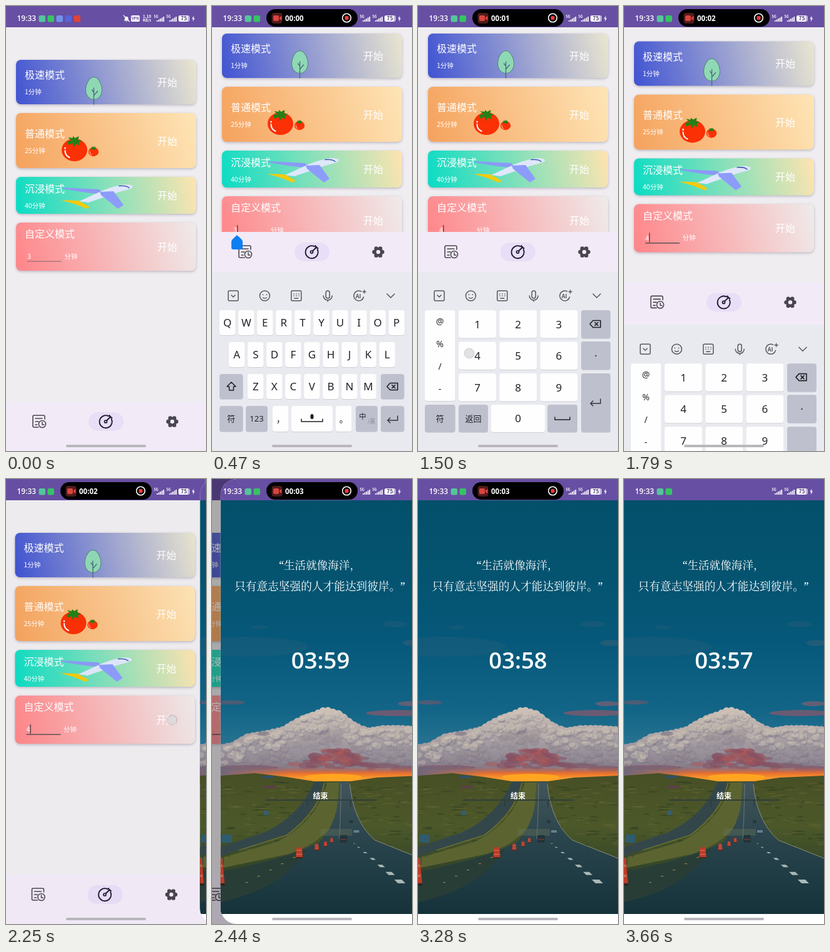
These frames come from a looping animation (320x711 px, 3.76 s). An HTML page with a canvas:

```html
<!DOCTYPE html>
<html lang="zh-CN">
<head>
<meta charset="utf-8">
<style>
html, body { margin: 0; width: 100%; height: 100%; overflow: hidden; background: #efedf0; }
canvas { display: block; width: 320px; height: 711px; }
</style>
</head>
<body>
<canvas id="stage"></canvas>
<script>
const W = 320, H = 711, LOOP = 3760;
const SANS = '"Noto Sans CJK SC", "Noto Sans CJK", "Noto Sans", sans-serif';
const LATIN = '"Noto Sans", "Noto Sans CJK SC", sans-serif';
const DIGITS = '"Open Sans", "Noto Sans", sans-serif';
const SERIF = '"Noto Serif", "Noto Serif CJK SC", "Noto Sans CJK SC", serif';
const PURPLE = '#674fa3', INK = '#49454f', DARK = '#1d192b';
const canvas = document.getElementById('stage');
const c = canvas.getContext('2d');
const dpr = window.devicePixelRatio || 1;
canvas.width = W * dpr;
canvas.height = H * dpr;

const clamp = v => Math.max(0, Math.min(1, v));
const ramp = (t, a, b) => clamp((t - a) / (b - a));
const easeOut = p => 1 - (1 - p) ** 3;

function text(s, x, y, size, { color = '#fff', weight = 400, align = 'left', font = SANS } = {}) {
  c.font = `${weight} ${size}px ${font}`;
  c.textAlign = align;
  c.fillStyle = color;
  c.fillText(s, x, y + size * 0.37);
}
function rect(x, y, w, h, color, r = 0) {
  c.fillStyle = color;
  c.beginPath();
  c.roundRect(x, y, w, h, r);
  c.fill();
}
function oval(x, y, rx, ry, color) {
  c.fillStyle = color;
  c.beginPath();
  c.ellipse(x, y, rx, ry, 0, 0, 7);
  c.fill();
}
const shape = (d, color) => { c.fillStyle = color; c.fill(new Path2D(d)); };
function line(d, color, width = 1.4) {
  c.strokeStyle = color;
  c.lineWidth = width;
  c.lineCap = c.lineJoin = 'round';
  c.stroke(new Path2D(d));
}
function at(x, y, draw) {
  c.save();
  c.translate(x, y);
  draw();
  c.restore();
}
function gradient(x0, y0, x1, y1, ...stops) {
  const g = c.createLinearGradient(x0, y0, x1, y1);
  stops.forEach((s, i) => g.addColorStop(i / (stops.length - 1), s));
  return g;
}
function seeded(seed) {
  return () => (seed = (seed * 16807) % 2147483647) / 2147483647;
}
const circle = r => `M${-r} 0a${r} ${r} 0 1 0 ${2 * r} 0a${r} ${r} 0 1 0 ${-2 * r} 0`;

// ---- status bar ----
function signal(x) {
  text('5G', x - 0.5, 16.5, 5.5, { weight: 700 });
  for (let i = 0; i < 5; i++) rect(x + 4 + i * 2.6, 23 - i * 1.5, 1.7, 2 + i * 1.5, '#fff', 0.5);
}
function statusBar(t) {
  text('19:33', 17.5, 20, 12, { weight: 600, font: DIGITS });
  const full = t < 100;
  ['#55c59a', '#35c463', '#7192ea', '#5564d8', '#e04436'].slice(0, full ? 5 : 2)
    .forEach((color, i) => rect(52.5 + i * 14, 15, 10.5, 10.5, color, 2.5));
  if (full) {
    shape('M188.5 23.5l1.5-2v-3a3 3 0 0 1 5.5 0v3l1.5 2zM191.5 24.5h2.500l-1.2 1.3z', '#fff');
    line('M188 15l9.5 10', '#fff', 1.1);
    rect(200, 15, 14, 10, '#fff', 2);
    text('VPN', 207, 20.2, 6, { color: PURPLE, weight: 700, align: 'center' });
    text('1.10', 225.5, 17, 6.3, { weight: 700, align: 'center' });
    text('KB/s', 225.5, 23.3, 5.8, { weight: 700, align: 'center' });
  }
  signal(237);
  signal(257);
  rect(276, 15, 18, 10, '#c5b9df', 3);
  rect(276, 15, 14.5, 10, '#fff', [3, 0, 0, 3]);
  text('75', 284.5, 20.2, 8.5, { color: '#4d3f78', weight: 700, align: 'center' });
  shape('M300.5 15.5l-3 5h2l-.6 4.5 3.2-5.5h-2z', '#fff');
  island(t);
}
function island(t) {
  const p = easeOut(ramp(t, 60, 260)) * (1 - ramp(t, 3500, 3640));
  if (t < 100 || p <= 0) return;
  c.save();
  c.beginPath();
  c.roundRect(160 - 73 * p, 5, 146 * p, 28, 14);
  c.clip();
  rect(87, 5, 146, 28, '#000');
  rect(95.5, 11, 17, 17, '#4f1c1c', 4);
  rect(98, 15, 9, 9, '#d8453f', 2);
  shape('M108 18l3.5-2v7l-3.5-2z', '#d8453f');
  const seconds = t < 700 ? 0 : t < 1550 ? 1 : t < 2400 ? 2 : 3;
  text('00:0' + seconds, 117, 19.5, 11.5, { weight: 700, font: LATIN });
  at(215.5, 19, () => line(circle(6.8), '#fff', 1.6));
  rect(212.5, 16, 6, 6, '#ee3b35', 1.5);
  c.restore();
}

// ---- home page ----
function card(y, h, from, to) {
  c.save();
  c.shadowColor = 'rgba(60,50,80,.3)';
  c.shadowBlur = 4 * dpr;
  c.shadowOffsetY = 1.5 * dpr;
  rect(16, y, 288, h, gradient(16, y + h, 304, y, from, to), 8);
  c.restore();
}
function tree() {
  const crown = 'M140.5 114c-7 0-12.5 11-12.5 20 0 9 5.5 15 12.5 15s12.5-6 12.5-15c0-9-5.5-20-12.5-20z';
  line(crown, '#45736c', 1.5);
  shape(crown, '#8fd8b5');
  line('M140.5 131v26M140.5 143l6-7M140.5 138l-3-4', '#486975', 1.3);
}
function tomato(x, y, k) {
  at(x, y, () => {
    c.scale(k, k);
    oval(0, 0, 20.5, 18, '#fb3005');
    shape('M-11-14l6-1-5-5 7 1 1-3 3 3 6-3-1 6 6 1-5 3 1 5-6-3-3 6-2-7-7 3z', '#238017');
    line('M-15 1q0 8 7 11', '#fff', 2);
    oval(-15, -3, 1.3, 1.6, '#fff');
  });
}
function plane() {
  shape('M88 310l28 1 18 10-5 3-17-7z', '#f4ca0c');
  shape('M89 290l60 3 8 8-30-3-36-6z', '#8b99f6');
  shape('M117 312c20-8 40-21 67-26 12-2 20 0 19 3-2 4-18 6-36 13l-35 12z', '#dfe7fb');
  shape('M150 297l22-1 16 22-9 6-27-22z', '#8d9cfb');
  line('M181 287.5q12-1 16 3', '#2949a8', 1.3);
}
function home(t, lift) {
  rect(0, 0, W, H, '#efedf0');
  at(0, -42 * lift, () => {
    card(86, 71, '#4053d2', '#eae6d0');
    card(171, 88, '#f5a25d', '#fee5b6');
    card(273, 59, '#0adcc4', '#ffe4b0');
    card(346, 77, '#ff8588', '#efebeb');
    tree();
    tomato(109.5, 230, 1);
    tomato(140, 233, 0.4);
    plane();
    [['极速模式', 110.5, '1分钟', 137.5, 122], ['普通模式', 204, '25分钟', 231, 216],
     ['沉浸模式', 292, '40分钟', 319, 303], ['自定义模式', 364.5, '分钟', 400, 385]]
      .forEach(([title, y, note, noteY, startY], i) => {
        text(title, 30, y, 16, { weight: 500 });
        text(note, i === 3 ? 93.5 : 30, noteY, 10.5);
        text('开始', 242, startY, 16, { weight: 500 });
      });
    const empty = t >= 1120 && t < 1440;
    text(t < 1120 ? '3' : empty ? '' : '4', 34, 400, 11);
    const focused = t >= 190;
    rect(34, 407.5, 55, focused ? 1.6 : 1, focused ? '#5d5356' : '#7c6a6c');
    if (focused) rect(empty ? 34 : 40, 392, 1.5, 15, '#65464f');
  });
  at(0, -271 * lift, bottomNav);
  rect(0, 0, W, 34, PURPLE);
}
function bottomNav() {
  rect(0, 632, W, 380, '#f2ebf7');
  rect(132, 649, 56, 30, '#e8def7', 15);
  at(53, 664, () => {
    line('M-1 9h-7q-2 0-2-2V-8q0-2 2-2H7q2 0 2 2v4M-6-5H5M-6 0h5M-6 5h3', INK, 1.6);
    at(5, 4, () => line(circle(5.6) + 'M0-3V1H3', INK, 1.5));
  });
  at(159.5, 664, () => {
    line('M4.5-8.8A10 10 0 1 0 9.2-4M1.5-1.5L8-8M6-10l1 3 3 1', DARK, 1.9);
    line(circle(2), DARK, 1.7);
  });
  at(266, 664, () => {
    for (let i = 0; i < 6; i++) {
      const a = i * Math.PI / 3;
      oval(6.5 * Math.cos(a), 6.5 * Math.sin(a), 3.2, 3.2, INK);
    }
    oval(0, 0, 7.3, 7.3, INK);
    oval(0, 0, 3.2, 3.2, '#f2ebf7');
  });
}

// ---- keyboard ----
function key(x, y, w, h, label = '', grey = false, size = 17) {
  rect(x, y + 1, w, h, '#ced0d7', 4);
  rect(x, y, w, h, grey ? '#bec1cd' : '#fefefe', 4);
  text(label, x + w / 2, y + h / 2, size, { color: '#202126', align: 'center', weight: 500, font: LATIN });
}
const backspace = (x, y) => at(x, y, () =>
  line('M-9 0l5-5.5H8v11H-4zM-1-2.5l5 5M4-2.5l-5 5', '#202126', 1.6));
const enter = (x, y) => at(x, y, () =>
  line('M8-5V2H-8M-4-2L-8 2-4 6', '#34363d', 1.5));
function toolbar() {
  const ink = '#55575e';
  const icons = [
    'M-8-6q0-2 2-2H6q2 0 2 2V6q0 2-2 2H-6q-2 0-2-2zM-3-1L0 2 3-1',
    circle(8) + 'M-3-2v.5M3-2v.5M-3 3q3 2 6 0',
    'M-8-6q0-2 2-2H6q2 0 2 2V6q0 2-2 2H-6q-2 0-2-2zM-4-3h.3M0-3h.3M4-3h.3M-4 0h.3M0 0h.3M4 0h.3M-3 4H3',
    'M-3-5a3 3 0 0 1 6 0V1a3 3 0 0 1-6 0zM-7 0a7 7 0 0 0 14 0M0 7V9',
    'M3-7A8 8 0 1 0 7 2M8-9v5M5.5-6.5h5',
    'M-6-3L0 3 6-3'
  ];
  icons.forEach((d, i) => at(34 + i * 50.4, 463, () => line(d, ink, 1.5)));
  text('AI', 234, 463.5, 9, { color: ink, weight: 700, align: 'center' });
}
function letterKeys() {
  [['QWERTYUIOP', 12, 486], ['ASDFGHJKL', 27, 537], ['ZXCVBNM', 57, 588]].forEach(([row, x, y]) =>
    [...row].forEach((ch, i) => key(x + i * 30.05, y, 25.5, 40, ch)));
  key(12, 588, 37.5, 40, '', true);
  at(31, 608, () => line('M0-7L-7 0h3.5v6h7V0H7z', '#202126', 1.5));
  key(270, 588, 37.5, 40, '', true);
  backspace(289, 608);
  key(12, 639, 37.5, 41, '符', true, 13);
  key(54, 639, 35, 41, '123', true, 13);
  key(97, 639, 25.5, 41, '，', false, 14);
  key(127, 639, 66, 41);
  line('M143 660v4h34v-4', '#202126', 1.5);
  rect(157.5, 652, 5, 8, '#202126', 2.5);
  key(198, 639, 25.5, 41, '。', false, 14);
  key(230, 639, 35, 41, '', true);
  text('中', 241, 656, 11.5, { color: '#202126', weight: 500, align: 'center' });
  text('/英', 255, 664, 9, { color: '#858894', align: 'center' });
  key(270, 639, 37.5, 41, '', true);
  enter(289, 660);
}
function numberKeys() {
  key(11, 486, 48.5, 145);
  [...'@%/-'].forEach((ch, i) =>
    text(ch, 35, 504 + i * 36, 14, { color: '#202126', align: 'center', font: LATIN }));
  for (let n = 0; n < 9; n++)
    key(65 + n % 3 * 65.2, 486 + Math.floor(n / 3) * 50.5, 60, 44.5, String(n + 1));
  key(261, 486, 47, 45, '', true);
  backspace(284, 508);
  key(261, 536, 47, 45, '·', true);
  key(261, 587, 47, 94, '', true);
  enter(284, 633);
  key(11, 637, 48.5, 44, '符', true, 13);
  key(65, 637, 47, 44, '返回', true, 13);
  key(117, 637, 86, 44, '0');
  key(207, 637, 48, 44, '', true);
  line('M219 657v4h24v-4', '#202126', 1.5);
}
function keyboard(t, lift) {
  if (lift <= 0) return;
  at(0, 287 * (1 - lift), () => {
    rect(0, 424, W, 290, '#e9eaf0');
    toolbar();
    (t < 850 ? letterKeys : numberKeys)();
  });
  if (t > 400 && t < 850)
    shape('M40 366l7 6.5q2 2 2 4.5v9q0 3-3 3H34q-3 0-3-3v-9q0-2.5 2-4.5z', '#0d7ff2');
}

// ---- countdown page ----
const ridge = [[0, 424], [20, 420], [45, 406], [75, 401], [100, 395], [130, 378], [150, 371], [168, 363],
  [190, 370], [210, 386], [235, 397], [262, 393], [290, 393], [320, 395]];
function ridgeAt(x) {
  const i = Math.max(1, ridge.findIndex(p => p[0] >= x));
  const [[x0, y0], [x1, y1]] = [ridge[i - 1], ridge[i]];
  return y0 + (y1 - y0) * (x - x0) / (x1 - x0);
}
function sky() {
  rect(0, 34, W, 661, gradient(0, 34, 0, 480, '#03506b', '#04536f', '#06587a', '#126587', '#3b7f9a'));
  [[40, 268, 100, 16, '#34617840'], [280, 232, 20, 5, '#34617850'], [62, 237, 13, 3, '#34617850'],
   [308, 262, 16, 5, '#45607470'], [18, 357, 21, 3.5, '#4c5c76'], [283, 374, 50, 5, '#6a5b72'],
   [303, 359, 19, 4, '#5f6077']].forEach(s => oval(...s));
}
function clouds() {
  const rnd = seeded(41);
  c.fillStyle = gradient(0, 365, 0, 475, '#cfc3b8', '#b3a9a8', '#97909a', '#7d7080');
  c.beginPath();
  for (let x = -4; x < W; x += 8) {
    const y = ridgeAt(clamp(x / W) * W), r = 5 + rnd() * 5;
    c.moveTo(x + r, y + r);
    c.arc(x, y + r, r, 0, 7);
    c.rect(x - 5, y + r, 10, 480 - y);
  }
  c.fill();
  for (let i = 0; i < 320; i++) {
    const x = rnd() * W, depth = rnd() ** 1.3, y = ridgeAt(x) + 7 + depth * 60;
    const r = 2 + rnd() * 5;
    oval(x, y + 2, r * 1.4, r, '#6a6c8030');
    oval(x - 1, y, r * 1.2, r * 0.8, depth < 0.45 ? '#ecdcc74c' : '#b5a39f38');
  }
  oval(69, 407, 10, 3.5, '#77707f90');
  for (let i = 0; i < 60; i++) {
    const k = rnd(), spread = 16 + k * 64;
    oval(182 + (rnd() - 0.5) * 2 * spread, 433 + k * 30, 6 + rnd() * 9, 2 + rnd() * 4,
      i % 3 ? '#85506190' : '#ad565680');
  }
  [[45, 461, 48, 4], [300, 463, 28, 5], [255, 458, 32, 4]].forEach(([x, y, rx, ry]) => oval(x, y, rx, ry, '#805868b0'));
  rect(0, 460, W, 26, gradient(0, 460, 0, 480, '#c2594c00', '#e8702f', '#ffa22b'));
  rect(0, 460, 110, 26, gradient(0, 0, 110, 0, '#70667a', '#70667a00'));
  oval(180, 476, 46, 5, '#ffa51f');
}
function land() {
  const rnd = seeded(9);
  shape('M0 474L55 470 105 476 150 483H208L250 477 320 474V695H0z',
    gradient(0, 470, 0, 640, '#474f25', '#4c5829', '#2e4127'));
  for (let i = 0; i < 260; i++)
    oval(rnd() * W, 484 + rnd() * 125, 2 + rnd() * 9, 0.5 + rnd(), i % 2 ? '#74703a50' : '#21352060');
  shape('M150 484H166Q156 530 106 568L0 602V588L70 565Q127 538 150 484z', '#33474a');
  shape('M171 485H190L185 540Q170 578 110 599L0 622V606L90 580Q155 548 171 485z', '#5b6431');
  line('M166 486Q157 532 106 569L30 593', '#77783d', 1.2);
  shape('M190 484H207Q213 548 247 577L320 606V695H0V628Q115 604 158 580Q191 548 190 484z',
    gradient(0, 484, 0, 695, '#42555a', '#27424a', '#15323a'));
  shape('M0 628Q90 610 140 590Q100 655 0 676z', '#293d37');
  line('M207 488Q213 548 247 577L320 606', '#8b8f76', 1);
  line('M193 488Q192 550 190 575', '#8b9486', 0.6);
  for (let i = 0; i < 7; i++) {
    const k = (i / 6) ** 1.3;
    at(212 + k * 66, 582 + k * 58, () => shape(`M0 0h${2 + k * 10}l${2 + k * 4} ${1 + k * 5}h${-2 - k * 10}z`, '#a9b9b7'));
  }
  for (let i = 0; i < 5; i++) rect(40 + i * 19, 644 - i * 10, 4, 1.2, '#94833f');
}
function roadside() {
  rect(72, 512, 178, 2, '#303e3c');
  rect(138, 513, 2, 10, '#303e3c');
  rect(207, 513, 2, 11, '#303e3c');
  rect(67, 474, 17, 4, '#315069');
  rect(69, 490, 20, 4, '#5b4048');
  rect(69, 530, 8, 7, '#355f70');
  rect(160, 559, 60, 11, '#69735b60');
  rect(191, 569, 12, 12, '#22343a', 2);
  rect(192, 575, 10, 1.5, '#6a3634');
  rect(211, 559, 13, 17, '#2c4350', 2);
  rect(213, 561, 9, 4, '#64808b');
  rect(206, 545, 6, 5, '#26383e');
  rect(2, 568, 16, 13, '#2f5b6e', 1);
  rect(4, 581, 1.5, 35, '#3c4640');
  rect(13, 581, 1.5, 23, '#3c4640');
  [[-8, 627, 2.7], [126, 597, 1.05], [154, 588, 0.65], [168, 583, 0.5], [178, 577, 0.45]].forEach(([x, y, k]) =>
    at(x, y, () => {
      c.scale(k, k);
      shape('M-4-8h8l1.500 16h-11z', '#c03a25');
      rect(-4, -4, 8, 1.2, '#b97763');
      rect(-4.5, 2, 9, 1.2, '#b97763');
      rect(-5.5, 7, 11, 1.5, '#2b2523');
    }));
}
function countdown(t) {
  rect(0, 0, W, H, '#fff');
  c.save();
  c.beginPath();
  c.rect(0, 34, W, 661);
  c.clip();
  sky();
  clouds();
  land();
  roadside();
  c.restore();
  rect(0, 0, W, 34, PURPLE);
  text('“生活就像海洋，', 93.5, 137, 17.6, { font: SERIF });
  text('只有意志坚强的人才能达到彼岸。”', 22.5, 171, 17.7, { font: SERIF });
  const left = t < 2720 ? 59 : t < 3570 ? 58 : 57;
  text('03:' + left, 160, 289, 36.5, { weight: 600, align: 'center', font: DIGITS });
  text('结束', 160, 507, 12, { weight: 700, align: 'center' });
}

// Each touch: start, end, x, y
const touches = [[100, 230, 62, 399], [760, 870, 72, 660], [1060, 1180, 284, 508],
  [1400, 1580, 82, 555], [1650, 1780, 286, 463], [2150, 2300, 266, 385]];

function slideProgress(t) {
  const s = Math.max(0, t - 2240) * 0.0246;
  return t > 2800 ? 1 : 1 - (1 + s) * Math.exp(-s);
}
function draw(t) {
  c.setTransform(dpr, 0, 0, dpr, 0, 0);
  const lift = easeOut(ramp(t, 210, 450)) * (1 - easeOut(ramp(t, 1760, 2040)));
  const slide = slideProgress(t);
  if (slide < 1) {
    at(-49 * slide, 0, () => {
      home(t, lift);
      keyboard(t, lift);
    });
    touches.filter(([a, b]) => t >= a && t < b).forEach(([, , x, y]) => {
      oval(x, y, 8.5, 8.5, '#9999a066');
      oval(x, y, 7, 7, '#f0f0f080');
    });
  }
  if (slide > 0) {
    rect(0, 0, W, H, `rgba(0,0,0,${0.3 * slide})`);
    at(W * (1 - slide), 0, () => {
      c.beginPath();
      c.roundRect(0, 0, W, H, slide < 1 ? [26, 0, 0, 26] : 0);
      c.clip();
      countdown(t);
    });
  }
  statusBar(t);
  rect(96, 701, 128, 4, '#b9b6bc', 2);
}

const start = performance.now();
function tick() {
  draw((performance.now() - start) % LOOP);
  requestAnimationFrame(tick);
}
tick();
</script>
</body>
</html>
```
